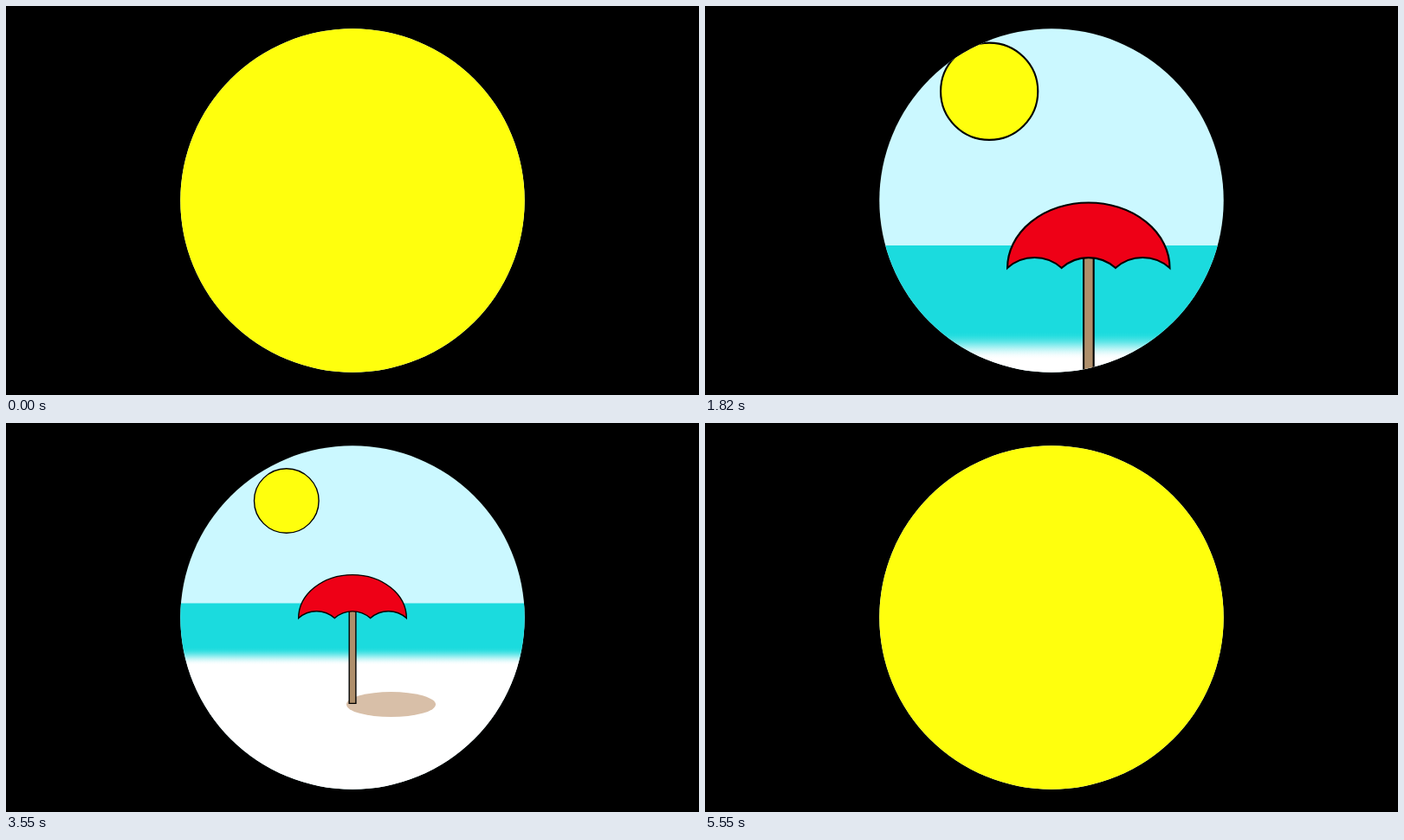
Animation, 800 px wide and 450 px high, one loop 5580 ms. Source, as an HTML page with a canvas:

```html
<!DOCTYPE html>
<html lang="en">
<head>
<meta charset="utf-8">
<title>Beach</title>
<style>
html, body { margin: 0; width: 100%; height: 100%; overflow: hidden; background: #000; }
canvas { display: block; }
</style>
</head>
<body>
<canvas id="stage" width="800" height="450"></canvas>
<script>
const ctx = document.getElementById('stage').getContext('2d');
const LOOP = 5580, OUT_END = 2760, IN_START = 4240;
const NEAR = 0.015;               // camera distance inside the sun, 1 = rest
const FOCUS = { x: 315.1, y: 72.6 };
const SEA = [27, 219, 222];

const circle = (x, y, r) => {
  const p = new Path2D();
  p.arc(x, y, r, 0, Math.PI * 2);
  return p;
};

const porthole = circle(400, 225, 198.7);
const sun = circle(323.8, 90, 37.3);
const pole = new Path2D('M396.2 217H403.9V324.4H396.2Z');
const shadow = new Path2D();
shadow.ellipse(444.5, 325.6, 51.5, 14.5, 0, 0, Math.PI * 2);
const canopy = new Path2D(
  'M337.7 225.8A62.3 50.2 0 0 1 462.3 225.8' +
  'A31 31 0 0 0 420.7 225.8A31 31 0 0 0 379.3 225.8A31 31 0 0 0 337.7 225.8Z');

// The camera moves at constant speed, so the scale is 1 / distance.
function distance(t) {
  if (t < OUT_END) return NEAR + (1 - NEAR) * t / OUT_END;
  if (t < IN_START) return 1;
  return 1 - (1 - NEAR) * (t - IN_START) / (LOOP - IN_START);
}

function shoreline(t) {
  return 260.4 + 13.5 * (1 - Math.cos((t - 3380) / LOOP * Math.PI * 2));
}

function outlined(path, color) {
  ctx.fillStyle = color;
  ctx.fill(path);
  ctx.stroke(path);
}

function drawSea(top, shore) {
  const start = shore - 1, size = 20;
  const fade = ctx.createLinearGradient(0, start, 0, start + size);
  for (let i = 0; i <= 8; i++) {
    const u = i / 8, k = u * u * (3 - 2 * u);
    const mix = SEA.map(c => Math.round(c + (255 - c) * k));
    fade.addColorStop(u, `rgb(${mix})`);
  }
  ctx.fillStyle = fade;
  ctx.fillRect(0, top, 800, 450 - top);
}

function draw(t) {
  const s = 1 / distance(t);
  ctx.fillStyle = '#000';
  ctx.fillRect(0, 0, 800, 450);
  ctx.save();
  ctx.clip(porthole);
  ctx.fillStyle = '#cbf8ff';
  ctx.fillRect(0, 0, 800, 450);

  ctx.translate(FOCUS.x, FOCUS.y);
  ctx.scale(s, s);
  ctx.translate(-FOCUS.x, -FOCUS.y);
  ctx.strokeStyle = '#000';
  ctx.lineWidth = 1.4;

  drawSea(208.5, shoreline(t));
  outlined(sun, '#ffff0d');
  ctx.fillStyle = '#d8bfa8';
  ctx.fill(shadow);
  outlined(pole, '#af8f6b');
  outlined(canopy, '#ee0016');
  ctx.restore();
}

const begin = performance.now();
function tick() {
  draw((performance.now() - begin) % LOOP);
  requestAnimationFrame(tick);
}
tick();
</script>
</body>
</html>
```
